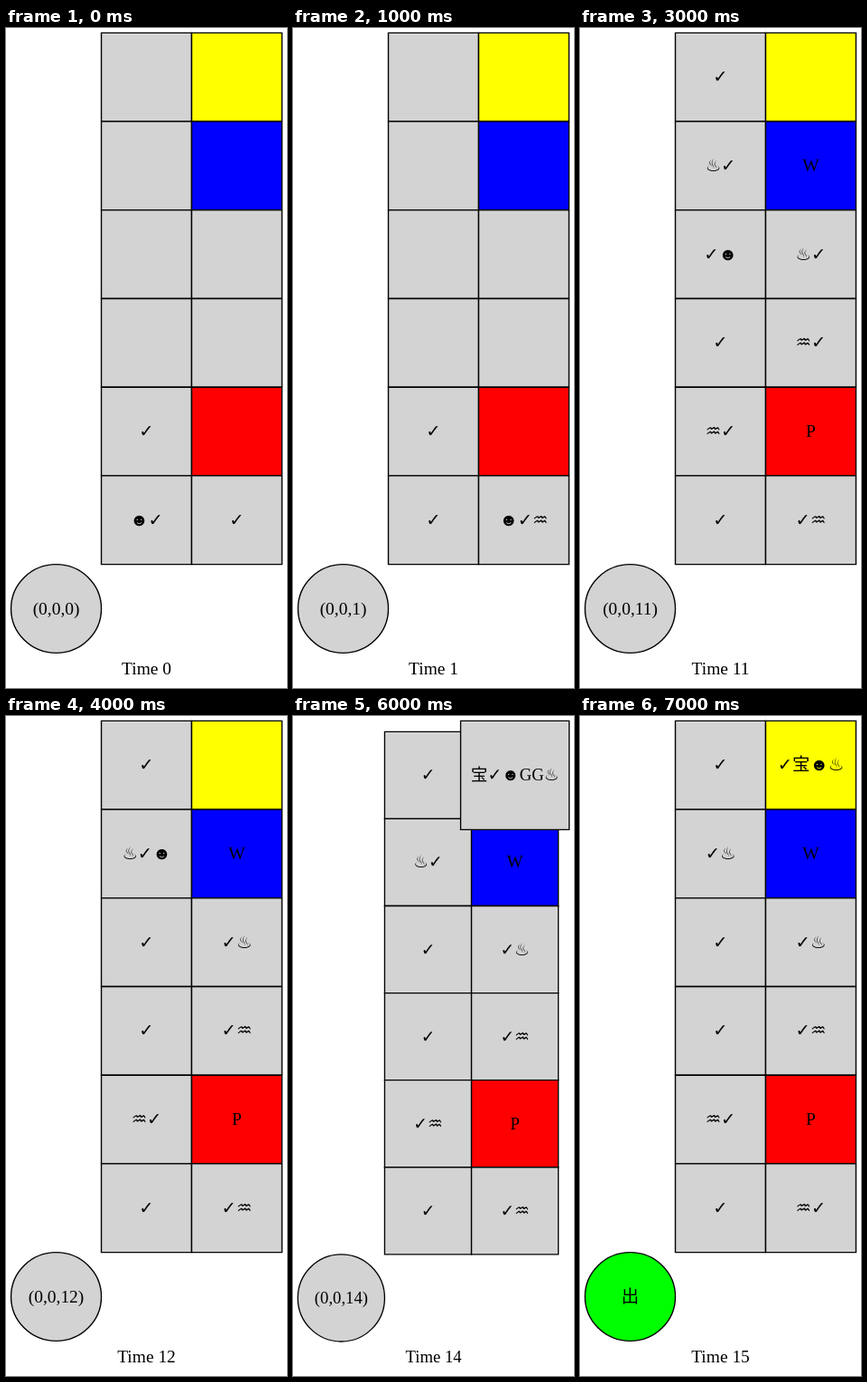
Recreate the animation shown at these times as an HTML page with a canvas. Size 311 px wide and 728 px high, loop 8 s.

```html
<!DOCTYPE html>
<html>
<head>
<meta charset="utf-8">
<style>
html, body { margin: 0; height: 100%; overflow: hidden; background: #fff; }
canvas { display: block; }
</style>
</head>
<body>
<canvas id="stage" width="311" height="728"></canvas>
<script>
const ctx = document.getElementById('stage').getContext('2d');
const CELL = 72, STEP_MS = 1000, GREY = '#d3d3d3';
const FILLS = { 1: '#ff0', 3: '#00f', 9: '#f00' };

// Cells run left to right, top to bottom; rows are split by "/".
const steps = [
  { time: 0, cells: ',/,/,/,/✓,/☻✓,✓' },
  { time: 1, cells: ',/,/,/,/✓,/✓,☻✓♒' },
  { time: 10, cells: '✓,/✓♨,W/✓,♨✓/✓☻,✓♒/♒✓,P/✓,✓♒' },
  { time: 11, cells: '✓,/♨✓,W/✓☻,♨✓/✓,♒✓/♒✓,P/✓,✓♒' },
  { time: 12, cells: '✓,/♨✓☻,W/✓,✓♨/✓,✓♒/♒✓,P/✓,✓♒' },
  { time: 13, cells: '☻✓,✓/♨✓,W/✓,♨✓/✓,♒✓/♒✓,P/✓,✓♒' },
  { time: 14, cells: '✓,宝✓☻GG♨/♨✓,W/✓,✓♨/✓,✓♒/✓♒,P/✓,✓♒', grow: 9 },
  { time: 15, cells: '✓,✓宝☻♨/✓♨,W/✓,✓♨/✓,✓♒/♒✓,P/✓,♒✓', done: true }
];

function label(text, x, baseline) {
  ctx.fillStyle = '#000';
  ctx.fillText(text.replace(/♒/g, '♒\uFE0E'), x, baseline);
}

function shape(fill) {
  ctx.fillStyle = fill;
  ctx.fill();
  ctx.stroke();
}

function drawCell(text, i, grow) {
  const x = 76 + (i % 2) * CELL, y = 4 + Math.floor(i / 2) * CELL;
  ctx.beginPath();
  ctx.rect(x - grow, y - grow, CELL + 2 * grow, CELL + 2 * grow);
  shape(grow ? GREY : FILLS[i] || GREY);
  label(text, x + CELL / 2, y + CELL / 2 + 4.5);
}

function draw({ time, cells, grow = 0, done }) {
  const width = 224 + grow;
  ctx.setTransform(1, 0, 0, 1, 0, 0);
  ctx.fillStyle = '#fff';
  ctx.fillRect(0, 0, 311, 728);

  ctx.save();
  ctx.beginPath();
  ctx.rect(0, 0, 311, 713);
  ctx.clip();
  // Each layout, measured in points, is fitted to the stage.
  ctx.scale(311 / width, 728 / (536.5 + grow));
  ctx.font = '14px "Liberation Serif", "DejaVu Sans", "Noto Sans CJK JP", "Noto Sans CJK SC", serif';
  ctx.textAlign = 'center';
  ctx.lineWidth = 1;
  label('Time ' + time, width / 2, 525.6 + grow);

  ctx.translate(0, grow);
  const texts = cells.split(/[,/]/);
  texts.forEach((text, i) => drawCell(text, i, 0));
  if (grow) drawCell(texts[1], 1, grow);

  ctx.beginPath();
  ctx.arc(40, 472, 36, 0, 2 * Math.PI);
  shape(done ? '#0f0' : GREY);
  label(done ? '出' : `(0,0,${time})`, 40, 476.5);
  ctx.restore();
}

let shown = -1;
function tick() {
  const index = Math.floor(performance.now() / STEP_MS) % steps.length;
  if (index !== shown) draw(steps[shown = index]);
  requestAnimationFrame(tick);
}
tick();
</script>
</body>
</html>
```
